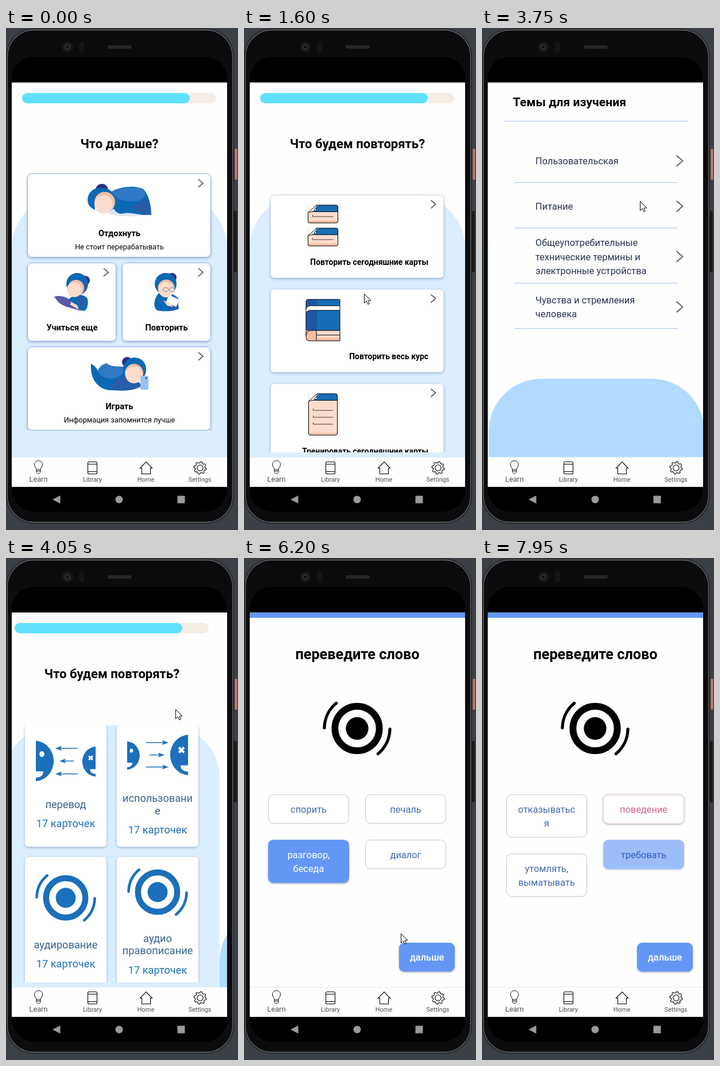
An HTML page with a canvas that plays this animation: 404 by 873 pixels, repeating every 8000 ms.

```html
<!DOCTYPE html>
<html lang="ru">
<head>
<meta charset="utf-8">
<title>Повторение</title>
<style>
html, body { margin: 0; width: 100%; height: 100%; overflow: hidden; background: #3a4046; }
canvas { display: block; width: 404px; height: 873px; font-family: Roboto, sans-serif; }
</style>
</head>
<body>
<canvas id="stage"></canvas>
<script>
const canvas = document.getElementById('stage');
const ctx = canvas.getContext('2d');
const dpr = window.devicePixelRatio || 1;
canvas.width = 404 * dpr;
canvas.height = 873 * dpr;

const LOOP = 8000, PAGE_W = 375, TOP = 94.5, SLIDE = 360;
const DP = PAGE_W / 411.43, ROUND = 100 * DP;
const BLUE = '#0a69b5', NAVY = '#2a2f86', MID = '#2b5ca8', LIGHT = '#2f79c4';
const SKIN = '#fbdccd', TAN = '#f3bda6', ICON = '#1c6fba', ACCENT = '#6497f5', INK = '#000';
const PAGE = '#fefefe';

const clamp = v => Math.max(0, Math.min(1, v));
const ramp = (t, start, len) => clamp((t - start) / len);
const ease = u => (1 - Math.cos(Math.PI * u)) / 2;

// ---------- drawing helpers ----------
function paint(fill, stroke, width = 1) {
  if (fill) { ctx.fillStyle = fill; ctx.fill(); }
  if (stroke) { ctx.strokeStyle = stroke; ctx.lineWidth = width; ctx.stroke(); }
}
function box(x, y, w, h, r, fill, stroke, width) {
  ctx.beginPath();
  ctx.roundRect(x, y, w, h, r);
  paint(fill, stroke, width);
}
function oval(x, y, rx, ry, fill, stroke, width) {
  ctx.beginPath();
  ctx.ellipse(x, y, rx, ry, 0, 0, 7);
  paint(fill, stroke, width);
}
const disc = (x, y, r, fill, stroke, width) => oval(x, y, r, r, fill, stroke, width);
function shape(d, fill, stroke, width = 1) {
  const p = new Path2D(d);
  if (fill) { ctx.fillStyle = fill; ctx.fill(p); }
  if (stroke) { ctx.strokeStyle = stroke; ctx.lineWidth = width; ctx.stroke(p); }
}
function text(str, x, y, dp, { weight = 400, color = INK, align = 'center' } = {}) {
  ctx.font = `${weight} ${dp * DP}px Roboto, sans-serif`;
  ctx.textAlign = align;
  ctx.fillStyle = color;
  ctx.fillText(str, x, y);
}
function raised(color, blur, dy, draw) {
  ctx.save();
  ctx.shadowColor = color;
  ctx.shadowBlur = blur * dpr;
  ctx.shadowOffsetY = dy * dpr;
  draw();
  ctx.restore();
}
function clipped(x, y, w, h, r, draw) {
  ctx.save();
  ctx.beginPath();
  ctx.roundRect(x, y, w, h, r);
  ctx.clip();
  draw();
  ctx.restore();
}
function card(x, y, w, h, border, r = 8) {
  raised('rgba(40,60,110,.35)', 4, 1.5, () => box(x, y, w, h, r, '#fff'));
  if (border) box(x + .5, y + .5, w - 1, h - 1, r, null, border);
}
function ripple(x, y, w, h, px, py, u) {
  if (u <= 0) return;
  clipped(x, y, w, h, 8, () => disc(px, py, Math.hypot(w, h) * u, 'rgba(87,130,255,.4)'));
}
const chevron = (x, y, s = 1) =>
  shape(`M${x - 4 * s} ${y - 7 * s}L${x + 4 * s} ${y}L${x - 4 * s} ${y + 7 * s}`, null, '#44464d', 1.6);

// ---------- shared page parts ----------
function arch() {
  box(10, 291, PAGE_W, 455, [ROUND, ROUND, 0, 0], '#dbeeff');
}
function header(title) {
  box(28, 113, 338, 18, 9, '#f5ede4');
  box(28, 113, 292, 18, 9, '#5fe1ff');
  text(title, 197.5, 209, 24.2, { weight: 700 });
}

// ---------- menu ----------
function sleeper() {
  oval(215, 321, 37, 6.5, '#dde4f8');
  shape('M180 288C192 276 226 272 240 281C250 292 253 312 253 324C238 328 222 320 206 322C196 326 188 318 184 308Z', BLUE);
  shape('M183 287C194 276 228 273 241 283C246 297 230 303 214 301C200 301 190 293 183 287Z', LIGHT);
  shape('M253 325C250 308 246 301 241 295C232 304 228 309 216 311C224 317 238 326 253 325Z', MID);
  disc(167, 282, 11, NAVY);
  shape('M142 299C143 283 156 276 169 278C184 280 193 291 192 306C190 314 184 318 178 319L155 316C147 313 142 307 142 299Z', BLUE);
  disc(172, 303, 18, TAN);
  disc(170, 307, 16, SKIN);
  shape('M155 311l3 3l-3 4z', '#fff');
}
function reader() {
  shape('M111 470C122 462 135 462 142 471C144 482 141 490 136 492C122 491 112 484 108 474Z', BLUE);
  shape('M125 468C133 464 138 470 138 480L127 491Z', MID);
  disc(138, 439, 8, NAVY);
  disc(124, 445, 19, BLUE);
  shape('M128 464C140 460 144 452 141 443L129 450Z', MID);
  disc(122, 452, 14, TAN);
  disc(119, 455, 13, SKIN);
  shape('M84 467C96 464 108 468 117 478L128 492C112 484 96 488 84 467Z', '#5b57a8');
  shape('M113 476L124 482L127 490L112 481Z', SKIN);
}
function reviewer() {
  shape('M265 462C257 472 256 486 263 491C278 494 293 492 300 489L300 470C290 460 276 458 265 462Z', BLUE);
  shape('M282 466C293 466 300 475 301 488L286 491Z', MID);
  disc(289, 434, 8, NAVY);
  disc(278, 445, 19, BLUE);
  disc(279, 452, 14.5, TAN);
  disc(279, 455, 13.5, SKIN);
  oval(278, 455, 5, 3.3, null, '#6f7488', .9);
  oval(289, 455, 5, 3.3, null, '#6f7488', .9);
  shape('M284 464L302 473L296 485L279 476Z', '#fff', '#c9cfe0', .7);
  shape('M274 474L286 478L291 485L281 483Z', SKIN);
}
function gamer() {
  shape('M148 584C153 586 157 590 160 596C162 590 168 585 175 583C186 594 198 590 214 592L236 622C220 634 196 630 180 630C158 627 146 608 148 584Z', BLUE);
  shape('M160 597C162 590 168 585 175 583C186 592 196 586 208 590C204 606 190 612 176 609C168 607 162 603 160 597Z', LIGHT);
  shape('M180 629C186 612 200 606 213 606L236 622C222 632 198 630 180 629Z', MID);
  disc(211, 581, 9, NAVY);
  disc(224, 593, 20, BLUE);
  shape('M214 612C230 618 244 610 244 594L230 600Z', MID);
  disc(223, 600, 16, TAN);
  disc(223, 603, 15, SKIN);
  box(234, 605, 14, 24, 2, '#96c0f2');
  disc(244, 609, 1.4, NAVY);
}
function menuPage(t) {
  arch();
  header('Что дальше?');
  const edge = '#8facee', bold = { weight: 700 };
  clipped(10, 240, PAGE_W, 460, 0, () => {
    card(37, 253, 320, 146, edge);
    card(37, 408, 155, 137, edge);
    card(202, 408, 155, 137, edge);
    card(37, 554, 320, 146, edge);
  });
  chevron(339, 270); chevron(174, 425); chevron(339, 425); chevron(339, 571);
  sleeper(); reader(); reviewer(); gamer();
  text('Отдохнуть', 197.5, 362, 16, bold);
  text('Не стоит перерабатывать', 197.5, 385, 14);
  text('Учиться еще', 115, 526, 16, bold);
  text('Повторить', 279.5, 526, 16, bold);
  text('Играть', 197.5, 663, 16, bold);
  text('Информация запомнится лучше', 197.5, 686, 14);
  ripple(202, 408, 155, 137, 280, 476, ramp(t, 920, 300));
}

// ---------- what to review ----------
function sheet(x, y, w, h, lines) {
  clipped(x, y, w, h, 3, () => {
    box(x, y, w, h, 0, SKIN);
    box(x, y, w, 12, 0, '#176db5');
    box(x, y + h - 4, w, 4, 0, TAN);
    shape(`M${x} ${y}h17l-5 9l-12 5z`, '#fff');
  });
  shape(`M${x + 15} ${y}H${x + w - 3}q3 0 3 3V${y + h - 3}q0 3 -3 3H${x + 3}q-3 0 -3 -3V${y + 13}Z`, null, INK);
  shape(`M${x + 15} ${y}l-2 10l-13 3M${x + 13} ${y + 11.5}H${x + w}`, null, INK, .9);
  disc(x + 13, y + 8, 2, '#fff', INK, .9);
  for (const ly of lines) shape(`M${x + 8} ${y + ly - 3}v3h${w - 16}`, null, '#4b3a36');
}
function book() {
  clipped(108, 472, 59, 72, 4, () => {
    box(108, 472, 59, 72, 0, '#176db5');
    box(108, 472, 19, 72, 0, '#1d57a5');
    box(108, 526, 59, 18, 0, SKIN);
    box(108, 526, 18, 18, 0, TAN);
    box(108, 539, 59, 5, 0, TAN);
    shape('M108 489C109 484 113 483 118 483H167V491H116C111 491 109 494 108 498Z', '#fff');
  });
  shape('M112 472H167V544H114Q108 544 108 537V477Q108 472 112 472M108 497C109 492 112 491 117 491H167M108 489C109 484 113 483 118 483H167M108 535C109 528 112 526 117 526H167M126 526V544M126 534H167', null, INK);
}
function reviewPage(t) {
  arch();
  header('Что будем повторять?');
  const right = { weight: 700, align: 'right' };
  clipped(10, 280, PAGE_W, 458, 0, () => {
    for (const y of [290, 454, 618]) {
      card(46, y, 302, 145, '#cfe0fb', 7);
      chevron(329.5, y + 16.5);
    }
    sheet(111.5, 308, 52, 31, [20]);
    sheet(111.5, 348, 52, 31, [20]);
    book();
    sheet(112.5, 636, 50, 72, [29, 41, 53]);
    text('Повторить сегодняшние карты', 321, 412, 15.25, right);
    text('Повторить весь курс', 321, 576, 15.25, right);
    text('Тренировать сегодняшние карты', 321, 740.5, 15.25, right);
    ripple(46, 454, 302, 145, 209, 462, ramp(t, 2170, 350));
  });
}

// ---------- topics ----------
function topicsPage() {
  box(10, 610, PAGE_W, 136, [ROUND, ROUND, 0, 0], '#b1dbff');
  text('Темы для изучения', 249, 136, 23.2, { weight: 700, align: 'right' });
  box(37, 161.5, 320, 1.2, 0, '#b3c9f4');
  const rows = [
    [231, 268, ['Пользовательская']],
    [310, 347, ['Питание']],
    [397.5, 443, ['Общеупотребительные', 'технические термины и', 'электронные устройства']],
    [485, 522, ['Чувства и стремления', 'человека']]
  ];
  for (const [y, line, words] of rows) {
    words.forEach((w, i) =>
      text(w, 91, y + 6 + (i - (words.length - 1) / 2) * 24.3, 18, { color: '#2a3450', align: 'left' }));
    chevron(342, y, 1.35);
    box(55, line, 284, 1.2, 0, '#b3c9f4');
  }
}

// ---------- exercise kinds ----------
function face(x, y, r, dir, dead) {
  const k = r / 35;
  ctx.save();
  ctx.translate(x, y);
  ctx.scale(dir * k, k);
  shape('M0 -35C17 -34 31 -19 31 0C31 19 17 34 0 35Z', ICON);
  shape('M0 18H13C13 25 8 29 0 29Z', '#fff');
  if (dead) shape('M7 -13L16 -4M16 -13L7 -4', null, '#fff', 4);
  else oval(10.5, -12, 4.3, 5, '#fff');
  ctx.restore();
}
function arrow(x, y, len, dir) {
  const tip = x + len * dir;
  shape(`M${x} ${y}H${tip - 5 * dir}`, null, ICON, 1.3);
  shape(`M${tip} ${y}l${-11 * dir} -4l${2 * dir} 4l${-2 * dir} 4z`, ICON);
}
function sound(x, y, color, k = 1) {
  ctx.save();
  ctx.translate(x, y);
  ctx.scale(k, k);
  disc(0, 0, 34.2, null, color, 10.5);
  disc(0, 0, 17.4, color);
  ctx.lineCap = 'round';
  for (const a of [0, Math.PI]) {
    ctx.beginPath();
    ctx.arc(0, 0, 50.5, a + .02, a + .88);
    paint(null, color, 4.6);
  }
  ctx.restore();
}
function kindsPage(t) {
  arch();
  header('Что будем повторять?');
  const label = { color: '#3a6390' }, count = { color: ICON };
  clipped(10, 290, PAGE_W, 448, 0, () => {
    for (const x of [46, 206]) {
      card(x, 290, 142, 212, null, 5);
      card(x, 520, 142, 230, null, 5);
    }
    face(65, 353, 35, 1);
    face(169, 354, 26, -1, true);
    arrow(138, 331, 39, -1); arrow(131, 353, 25, -1); arrow(138, 375.5, 39, -1);
    face(224, 343.5, 24.5, 1);
    face(330, 342.5, 35, -1, true);
    arrow(257, 321, 39, 1); arrow(263, 342.5, 26, 1); arrow(257, 363.5, 39, 1);
    sound(117, 591, ICON);
    sound(277, 581, ICON);
    text('перевод', 117, 435, 20, label);
    text('использовани', 277, 424, 20, label);
    text('е', 277, 445.5, 20, label);
    text('аудирование', 117, 678.5, 20, label);
    text('аудио', 277, 667.5, 20, label);
    text('правописание', 277, 689, 20, label);
    for (const [x, y] of [[117, 468], [277, 479], [117, 711.5], [277, 722.5]])
      text('17 карточек', x, y, 20, count);
    ripple(206, 520, 142, 230, 262, 600, ramp(t, 4800, 300));
  });
}

// ---------- quiz ----------
function option(x, y, words, picked = 0, pink = 0) {
  const h = words.length > 1 ? 75 : 51;
  box(x + .5, y + .5, 140, h - 1, 9, '#fff', pink ? '#f0c8d4' : '#cbc4ca');
  if (pink) raised('rgba(90,40,70,.35)', 3, 1, () => box(x, y, 141, h, 9, '#fff', '#f3dbe3'));
  if (picked) {
    raised(`rgba(40,60,110,${.4 * picked})`, 3, 1.5, () => box(x, y, 141, h, 9, '#fff'));
    ctx.globalAlpha = picked;
    box(x, y, 141, h, 9, ACCENT);
    ctx.globalAlpha = 1;
  }
  const color = picked > .8 ? '#fff' : pink && !picked ? '#d4668a' : picked ? '#2f5fbe' : '#4468ac';
  words.forEach((w, i) => text(w, x + 70.5, y + 31.5 + i * 24.3, 18, { color }));
}
function quizFrame(next) {
  box(10, TOP, PAGE_W, 104 - TOP, 0, ACCENT);
  text('переведите слово', 197.5, 176, 27.7, { weight: 700 });
  sound(197, 296.5, INK, 1.13);
  if (!next) return;
  ctx.save();
  ctx.globalAlpha = next;
  raised('rgba(40,60,110,.45)', 3, 1.5, () => box(270, 669, 97, 50, 9, ACCENT));
  text('дальше', 318.5, 700, 18, { weight: 500, color: '#fff' });
  ctx.restore();
}
function quizOne(t) {
  const picked = ramp(t, 5980, 120);
  quizFrame(picked);
  option(42, 411, ['спорить']);
  option(211, 411, ['печаль']);
  option(42, 490, ['разговор,', 'беседа'], picked);
  option(211, 490, ['диалог']);
}
function quizTwo(t) {
  const first = ramp(t, 7450, 120), second = ramp(t, 7850, 160);
  quizFrame(first);
  option(42, 411, ['отказыватьс', 'я']);
  option(42, 514, ['утомлять,', 'выматывать']);
  option(211, 411, ['поведение'], first * (1 - ramp(t, 7850, 80)), second);
  option(211, 490, ['требовать'], second);
}

// ---------- device ----------
function phone() {
  box(0, 0, 404, 873, 0, '#3a4046');
  box(397, 318, 5, 107, 2, '#1b1b1c');
  box(398.5, 210, 4, 54, 1.5, '#c9796b');
  box(0, 1, 397, 861, 48, '#232426');
  box(2.5, 3.5, 392, 856, 46, '#0c0c0e', '#66686a', 1.3);
  box(10, 50, PAGE_W, 791, 38, '#000');
  disc(107, 33, 9.5, '#18181a');
  disc(107, 33, 5, '#2c2c2f');
  disc(107, 33, 2.2, '#0a0a0c');
  box(127, 23, 9, 20, 4, '#151517');
  box(177, 30, 42, 6, 3, '#272728');
  shape('M81 820L94.5 813V827Z', '#9b9b9b');
  disc(197, 820, 6.5, '#9b9b9b');
  box(298.5, 813.5, 13, 13, 1, '#9b9b9b');
}
function gear(x, y) {
  ctx.beginPath();
  for (let i = 0; i < 32; i++) {
    const a = (i + .5) * Math.PI / 16, r = i % 4 < 2 ? 11 : 8.6;
    ctx.lineTo(x + r * Math.cos(a), y + r * Math.sin(a));
  }
  ctx.closePath();
  paint(null, INK, 1.1);
  disc(x, y, 5.2, null, INK, 1.1);
}
function tabs() {
  box(10, 746, PAGE_W, 52, 0, PAGE);
  box(10, 746, PAGE_W, 1, 0, '#e6edf5');
  shape('M53 768C53 765 49.500 763.500 49.500 759C49.500 755 52.500 752.500 56.500 752.500C60.500 752.500 63.500 755 63.500 759C63.500 763.500 60 765 60 768ZM53 768V772.500L55 774.500H58L60 772.500V768M53 770.500H60', null, INK, .95);
  box(142.5, 754.5, 16, 21, 2, null, INK, 1.1);
  shape('M143 758.500H158.500M143 771.500H158.500', null, INK, 1.1);
  shape('M233.500 765.500L244 754.500L254.500 765.500H251.500V775.500H236.500V765.500Z', null, INK, 1.1);
  gear(338, 765);
  const gray = { color: '#4e4e52' };
  text('Learn', 56.5, 789, 14, gray);
  text('Library', 150.5, 789, 12, gray);
  text('Home', 243.5, 789, 12, gray);
  text('Settings', 337.5, 789, 12, gray);
}

// Each run is a visible stretch of [time, x, y] points.
const runs = [
  [[50, 396, 841], [600, 396, 841], [900, 280, 476], [1000, 280, 476]],
  [[1350, 231, 361], [1400, 231, 361], [1600, 209, 462], [2200, 209, 462]],
  [[2950, 267, 306], [3150, 272, 308], [3700, 272, 308], [4050, 295, 261], [4250, 262, 600],
    [5000, 262, 600], [5250, 400, 383], [5300, 420, 370]],
  [[5750, 404, 430], [5930, 115, 525], [6040, 115, 525], [6200, 273, 653], [6330, 312, 690],
    [6470, 312, 690], [6750, 404, 610]],
  [[7200, 300, 833], [7400, 280, 438], [7520, 280, 438], [7780, 284, 515], [7870, 284, 515]]
];
function pointer(t) {
  const run = runs.find(r => t >= r[0][0] && t < r[r.length - 1][0]);
  if (!run) return;
  const i = run.findIndex(p => p[0] > t);
  const [t0, x0, y0] = run[i - 1], [t1, x1, y1] = run[i];
  const u = (t - t0) / (t1 - t0);
  ctx.save();
  ctx.translate(Math.round(x0 + (x1 - x0) * u) + .5, Math.round(y0 + (y1 - y0) * u) + .5);
  shape('M0 0V16L3.800 12.500L6.300 18L8.800 17L6.400 11.500H11.500Z', '#fff', INK);
  ctx.restore();
}

const pages = [menuPage, reviewPage, topicsPage, kindsPage, quizOne, quizTwo];
const slides = [1040, 2591, 3734, 5055, 6480];

function drawPage(i, dx, t) {
  ctx.save();
  ctx.translate(dx, 0);
  clipped(10, TOP, PAGE_W, 746 - TOP, 0, () => pages[i](t));
  ctx.restore();
}
function render(t) {
  ctx.setTransform(dpr, 0, 0, dpr, 0, 0);
  phone();
  const at = slides.filter(s => t >= s).length;
  const u = at ? ease(ramp(t, slides[at - 1], SLIDE)) : 1;
  const dx = Math.round(PAGE_W * u);
  clipped(10, TOP, PAGE_W, 746 - TOP, 0, () => {
    box(10, TOP, PAGE_W, 746 - TOP, 0, PAGE);
    if (dx < PAGE_W) drawPage(at - 1, dx, t);
    drawPage(at, dx - PAGE_W, t);
  });
  tabs();
  pointer(t);
}

const begin = performance.now();
function tick() {
  render((performance.now() - begin) % LOOP);
  requestAnimationFrame(tick);
}
tick();
</script>
</body>
</html>
```
